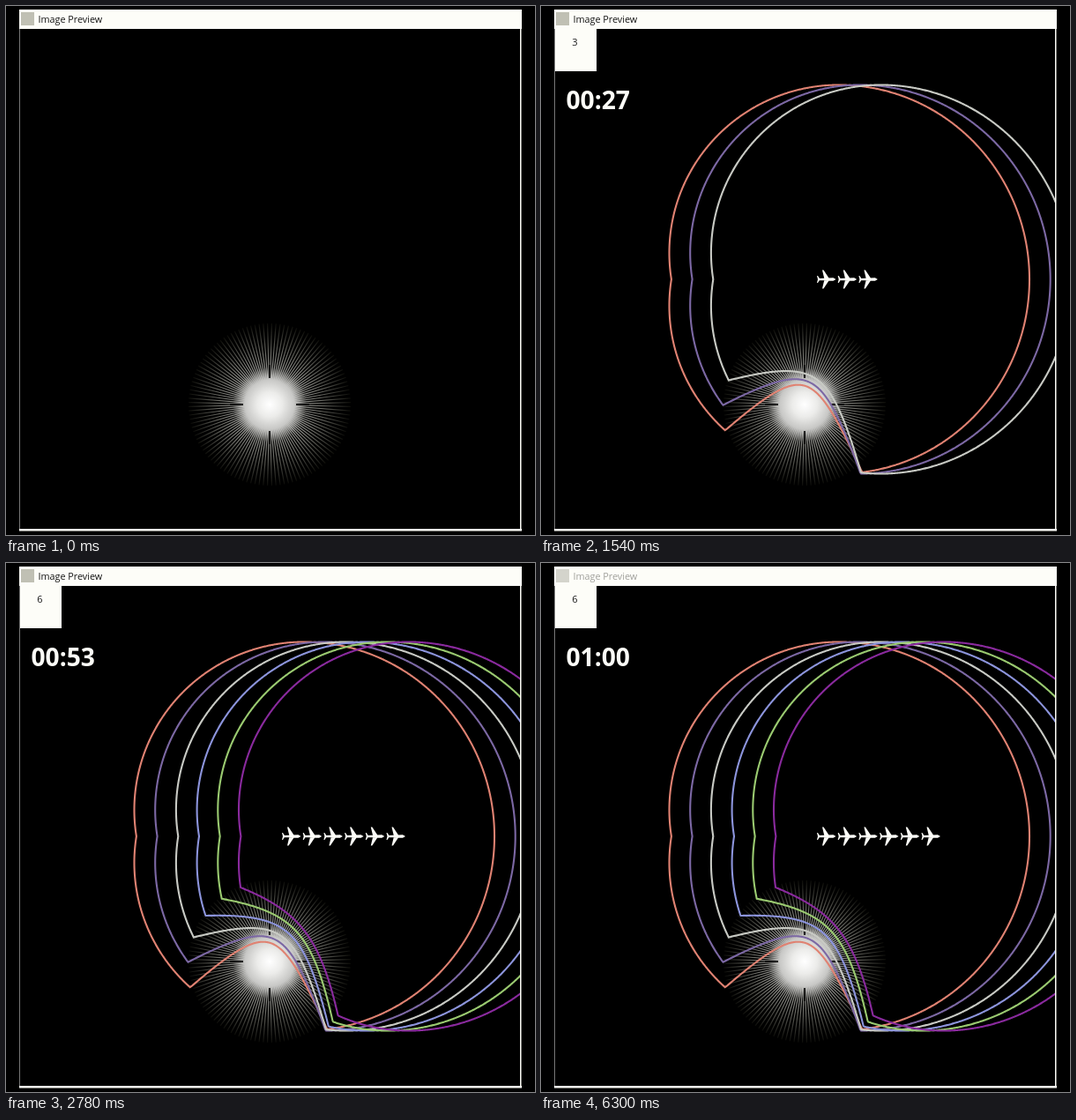
An HTML page with a canvas for the animation above (6.32 s loop, 600x600 px).

```html
<!DOCTYPE html>
<html lang="en">
<head>
<meta charset="utf-8">
<title>Image Preview</title>
<style>
html, body { margin: 0; width: 100%; height: 100%; overflow: hidden; background: #000; }
canvas { display: block; }
</style>
</head>
<body>
<canvas id="stage" width="600" height="600"></canvas>
<script>
const ctx = document.getElementById('stage').getContext('2d');
const LOOP = 6320, WHITE = '#fdfdf8', RAD = Math.PI / 180;
const SUN = { x: 299, y: 452, radius: 92 };
const COLORS = ['#e08272', '#7c68a4', '#c8cac4', '#8c94dc', '#9aca70', '#8a2a9e'];
const planeX = i => 323 + 23.7 * i, PLANE_Y = 310;

const plane = new Path2D('M11 0L8-1.7-9-1-9 1 8 1.7Z' +
  'M4 0L-3-10.5-4.5-10.5-2 0-4.5 10.5-3 10.5Z' +
  'M-7 0L-9.5-4-10.5-4-9.5 0-10.5 4-9.5 4Z');
const contours = COLORS.map((color, i) => contourPath(i));

// Distance from the origin along an angle to an ellipse around (cx, cy).
function rayToEllipse(angle, cx, cy, rx, ry) {
  const c = Math.cos(angle) / rx, s = Math.sin(angle) / ry, x = cx / rx, y = cy / ry;
  const a = c * c + s * s, b = x * c + y * s;
  return (b + Math.sqrt(b * b - a * (x * x + y * y - 1))) / a;
}

// Free range: half an ellipse ahead, two overlapping arcs behind.
function freeRange(angle) {
  const ahead = rayToEllipse(angle, 15, 0, 216, 220.5);
  if (ahead * Math.cos(angle) >= 15) return ahead;
  return rayToEllipse(angle, 15, 30 * Math.sign(Math.sin(angle)), 192.5, 190.5);
}

// Range towards the sun: shortest near its direction, opening out to both sides.
function dazzledRange(angle, i) {
  const sunAngle = Math.atan2(SUN.y - PLANE_Y, SUN.x - planeX(i)) / RAD + 2.5;
  const offset = (angle / RAD - sunAngle) / (34 + 4 * i);
  return Math.abs(offset) < 1 ? (123 + i * i) / (1 - offset * offset) : Infinity;
}

function contourPath(i) {
  const path = new Path2D();
  for (let deg = -180; deg < 180; deg += 0.25) {
    const angle = deg * RAD, r = Math.min(freeRange(angle), dazzledRange(angle, i));
    path.lineTo(planeX(i) + r * Math.cos(angle), PLANE_Y + r * Math.sin(angle));
  }
  path.closePath();
  return path;
}

function radial(radius, ...colors) {
  const g = ctx.createRadialGradient(0, 0, 0, 0, 0, radius);
  colors.forEach((color, i) => g.addColorStop(i / (colors.length - 1), color));
  return g;
}

function drawSun() {
  ctx.save();
  ctx.translate(SUN.x, SUN.y);
  ctx.beginPath();
  for (let deg = 1.5; deg < 360; deg += 3) {
    ctx.moveTo(0, 0);
    ctx.lineTo(SUN.radius * Math.cos(deg * RAD), SUN.radius * Math.sin(deg * RAD));
  }
  ctx.lineWidth = 1.2;
  ctx.strokeStyle = radial(SUN.radius, '#fff', '#b4b4b0', '#60605a', '#0c0c08');
  ctx.stroke();
  ctx.fillStyle = radial(42, '#fff', '#ececea', '#c8c8c6', 'rgba(160,160,156,0)');
  ctx.fillRect(-42, -42, 84, 84);
  ctx.fillStyle = '#000';
  for (let i = 0; i < 4; i++) {
    ctx.fillRect(30, -0.8, 15, 1.6);
    ctx.rotate(Math.PI / 2);
  }
  ctx.restore();
}

function rect(color, x, y, w, h) {
  ctx.fillStyle = color;
  ctx.fillRect(x, y, w, h);
}

function text(string, x, y, font, color, align = 'left') {
  ctx.font = font + ' "Open Sans", "Noto Sans", sans-serif';
  ctx.fillStyle = color;
  ctx.textAlign = align;
  ctx.fillText(string, x, y);
}

function drawWindow(active) {
  rect(WHITE, 15, 4, 570, 22);
  rect('#777', 15, 26, 1, 569);
  rect(WHITE, 583, 26, 1.5, 569);
  rect(WHITE, 15, 593, 570, 2.5);
  rect(active ? '#c0c0b4' : '#d4d4cc', 17, 7, 15, 15);
  text('Image Preview', 36.5, 19, '10.8px', active ? '#141414' : '#a0a09c');
}

function drawScene(seconds) {
  const count = Math.min(6, Math.floor(seconds / 10) + 1);
  ctx.save();
  ctx.beginPath();
  ctx.rect(16, 26, 568, 567);
  ctx.clip();
  ctx.lineWidth = 2.1;
  for (let i = 0; i < count; i++) {
    ctx.strokeStyle = COLORS[i];
    ctx.stroke(contours[i]);
    ctx.save();
    ctx.translate(planeX(i) + 0.5, PLANE_Y);
    ctx.fillStyle = WHITE;
    ctx.fill(plane);
    ctx.restore();
  }
  ctx.restore();
  rect(WHITE, 16, 26, 47, 48);
  text(count, 38.5, 45, '11px', '#1c1c1c', 'center');
  const pad = n => String(n).padStart(2, '0');
  text(pad(Math.floor(seconds / 60)) + ':' + pad(seconds % 60), 28.5, 117, 'bold 28.2px', WHITE);
}

// Ticks come in threes: 20, 20 and 100 ms.
function tickAt(ms) {
  const u = ms + 20;
  return 3 * Math.floor(u / 140) + Math.min(2, Math.floor(u % 140 / 20)) - 1;
}

function draw(now) {
  const ms = now % LOOP, tick = tickAt(ms);
  rect('#000', 0, 0, 600, 600);
  drawSun();
  if (tick > 0) drawScene(Math.max(0, Math.min(60, tick - 6)));
  drawWindow(ms < 5880);
}

const start = performance.now();
function frame() {
  draw(performance.now() - start);
  requestAnimationFrame(frame);
}
frame();
</script>
</body>
</html>
```
